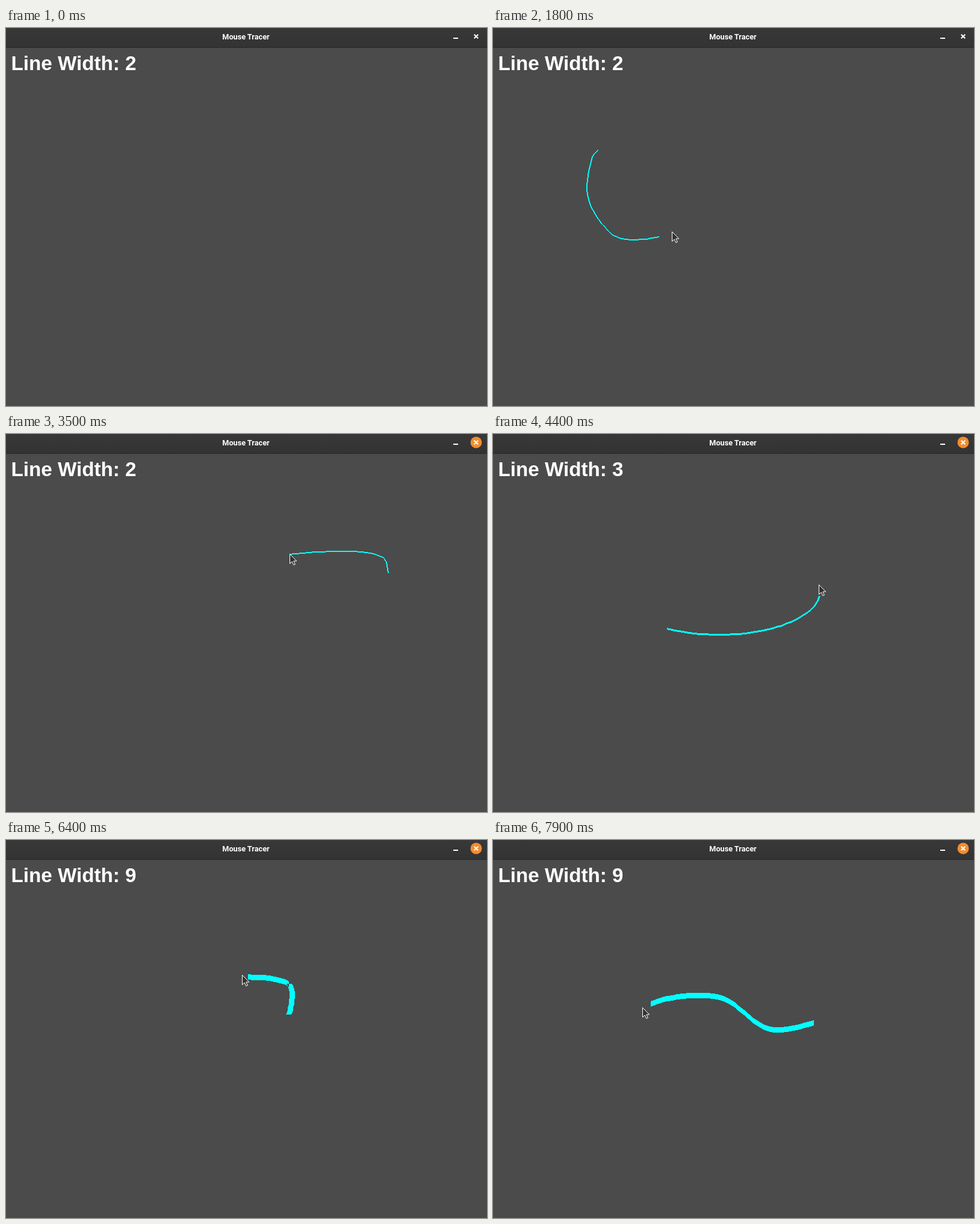
An HTML page for the animation above (8 s loop, 799 px wide and 628 px high).

```html
<!DOCTYPE html>
<html lang="en">
<head>
<meta charset="utf-8">
<title>Mouse Tracer</title>
<style>
  html, body { margin: 0; width: 100%; height: 100%; overflow: hidden; background: #4b4b4b; }
  svg { display: block; width: 799px; height: 628px; }
  .title { font: 700 12.7px Roboto, sans-serif; text-anchor: middle; }
  .label { font: 700 33.2px "Liberation Sans", Arial, sans-serif; }
  text { fill: #fff; white-space: pre; }
</style>
</head>
<body>
<svg viewBox="0 0 799 628">
  <defs>
    <linearGradient id="bar" x2="0" y2="1">
      <stop stop-color="#383838"/>
      <stop offset="1" stop-color="#333"/>
    </linearGradient>
    <clipPath id="client"><rect y="33" width="799" height="595"/></clipPath>
  </defs>
  <rect width="799" height="628" fill="#4b4b4b"/>
  <path id="trail" fill="#0ff" clip-path="url(#client)" shape-rendering="crispEdges"/>
  <text class="label" x="8.5" y="70">Line Width: <tspan id="width">2</tspan></text>
  <rect width="799" height="32" fill="url(#bar)"/>
  <rect y="32" width="799" height="1" fill="#282828"/>
  <text class="title" x="398.5" y="19">Mouse Tracer</text>
  <rect x="743" y="16" width="8" height="2" fill="#fff"/>
  <circle id="hot" cx="781" cy="14" r="9.5" fill="#f28c2f"/>
  <path d="M777.7 10.7l6.6 6.6m0-6.6l-6.6 6.6" stroke="#fff" stroke-width="2"/>
  <path id="cursor" d="M.5.5V16.5L4.2 13 6.8 18.6 9.4 17.5 6.9 12H11.8Z" fill="#333" stroke="#fff"/>
</svg>
<script>
const LOOP = 8000, STEP = 100, START = 400;
const REST = 3300, REST_LENGTH = 200;   // the mouse stands still here
const TRAIL = 400, LAG = 25, SAMPLE = 12.5;
const WIDER_FROM = 4200, WIDER_EVERY = 350, MAX_WIDTH = 9;

const $ = id => document.getElementById(id);
const clamp = (v, lo, hi) => Math.min(hi, Math.max(lo, v));
const distance = (a, b) => Math.hypot(b.x - a.x, b.y - a.y);

const keys = [{ t: START, x: 330, y: 3 }];

// Passes through the points at constant speed.
function glide(duration, ...points) {
  const start = keys[keys.length - 1];
  const stops = points.map(([x, y]) => ({ x, y }));
  const legs = stops.map((p, i) => distance(i ? stops[i - 1] : start, p));
  const total = legs.reduce((a, b) => a + b);
  let gone = 0;
  stops.forEach((p, i) => {
    gone += legs[i];
    keys.push({ ...p, t: start.t + duration * gone / total });
  });
}

function arc(duration, cx, cy, rx, ry, from, to) {
  const count = Math.round(duration / 25);
  glide(duration, ...Array.from({ length: count }, (_, i) => {
    const a = (from + (to - from) * (i + 1) / count) * Math.PI / 180;
    return [cx + rx * Math.cos(a), cy + ry * Math.sin(a)];
  }));
}

// First loop
glide(220, [200, 150], [189, 215]);
arc(580, 312, 250, 123, 52, 180, -90);
glide(200, [175, 202]);
glide(375, [159, 240], [160, 288], [205, 347], [276, 347]);
glide(25, [297, 338]);
// Over to the right and back to rest
glide(300, [380, 310], [434, 255]);
arc(500, 540, 265, 100, 67, 190, 365);
glide(300, [635, 231]);
glide(400, [628, 207], [590, 196], [517, 196], [471, 199.6]);
// Wide loop
glide(150, [330, 203]);
arc(1000, 375, 262, 168, 71, 235, -90);
glide(150, [269, 191]);
glide(375, [215, 189], [190, 204], [168, 247]);
glide(25, [165, 260]);
// Lower loop
arc(700, 318, 290, 153, 82, 190, 25);
glide(100, [469, 290]);
glide(375, [472, 281], [472, 242], [444, 230], [402, 227]);
glide(25, [392, 224]);
glide(200, [250, 312]);
glide(200, [253, 332]);
// Up, around and back to the left
glide(200, [266, 343], [300, 344], [384, 322]);
glide(175, [447, 293], [460, 264], [460, 198], [481, 187]);
glide(25, [507, 175]);
arc(300, 520, 240, 49, 65, -70, 75);
glide(375, [460, 314], [380, 262], [295, 262], [262, 272]);
glide(25, [248, 278]);

// Centripetal Catmull-Rom between neighbouring keys.
function slope(i, axis) {
  const a = keys[i - 1], b = keys[i], c = keys[i + 1];
  if (!a || !c) return 0;
  const d0 = Math.sqrt(distance(a, b)), d1 = Math.sqrt(distance(b, c));
  return (b[axis] - a[axis]) / d0 - (c[axis] - a[axis]) / (d0 + d1) + (c[axis] - b[axis]) / d1;
}

function pointAt(t) {
  const i = keys.findIndex(p => p.t >= t - 1e-6);
  if (i <= 0) return keys.at(i);
  const a = keys[i - 1], b = keys[i];
  const k = (t - a.t) / (b.t - a.t), span = Math.sqrt(distance(a, b));
  const blend = axis =>
    a[axis] + (b[axis] - a[axis]) * k * k * (3 - 2 * k) +
    span * k * (1 - k) * (slope(i - 1, axis) * (1 - k) - slope(i, axis) * k);
  return { x: blend("x"), y: blend("y") };
}

// Thickness is measured along one axis, so diagonals look thinner.
function segment(a, b, w) {
  const flat = Math.abs(b.x - a.x) >= Math.abs(b.y - a.y);
  const before = Math.floor(w / 2);
  const side = flat ? `v${w}` : `h${w}`, back = flat ? `v${-w}` : `h${-w}`;
  const [ox, oy] = flat ? [0, before] : [before, 0];
  return `M${a.x - ox} ${a.y - oy}${side}l${b.x - a.x} ${b.y - a.y}${back}Z`;
}

function trailShape(from, to, w) {
  const points = [];
  for (let t = from; t <= to; t += SAMPLE) {
    const p = pointAt(t);
    points.push({ x: Math.round(p.x), y: Math.round(p.y) });
  }
  return points.slice(1).map((p, i) => segment(points[i], p, w)).join("");
}

function draw(t) {
  const moved = t - clamp(t - REST, 0, REST_LENGTH);
  const resting = t >= REST && t <= REST + REST_LENGTH;
  const lineWidth = clamp(3 + Math.floor((t - WIDER_FROM) / WIDER_EVERY), 2, MAX_WIDTH);
  const tip = pointAt(moved);
  $("trail").setAttribute("d",
    trailShape(Math.max(START, moved - TRAIL), resting ? moved : moved - LAG, lineWidth));
  $("cursor").setAttribute("transform",
    `translate(${Math.round(tip.x)} ${Math.floor(tip.y + 0.3)})`);
  $("cursor").style.display = t < START ? "none" : "";
  $("hot").style.display = t < REST + REST_LENGTH ? "none" : "";
  $("width").textContent = lineWidth;
}

const origin = performance.now();
function tick() {
  const t = (performance.now() - origin) % LOOP;
  draw(Math.floor(t / STEP) * STEP);
  requestAnimationFrame(tick);
}
tick();
</script>
</body>
</html>
```
